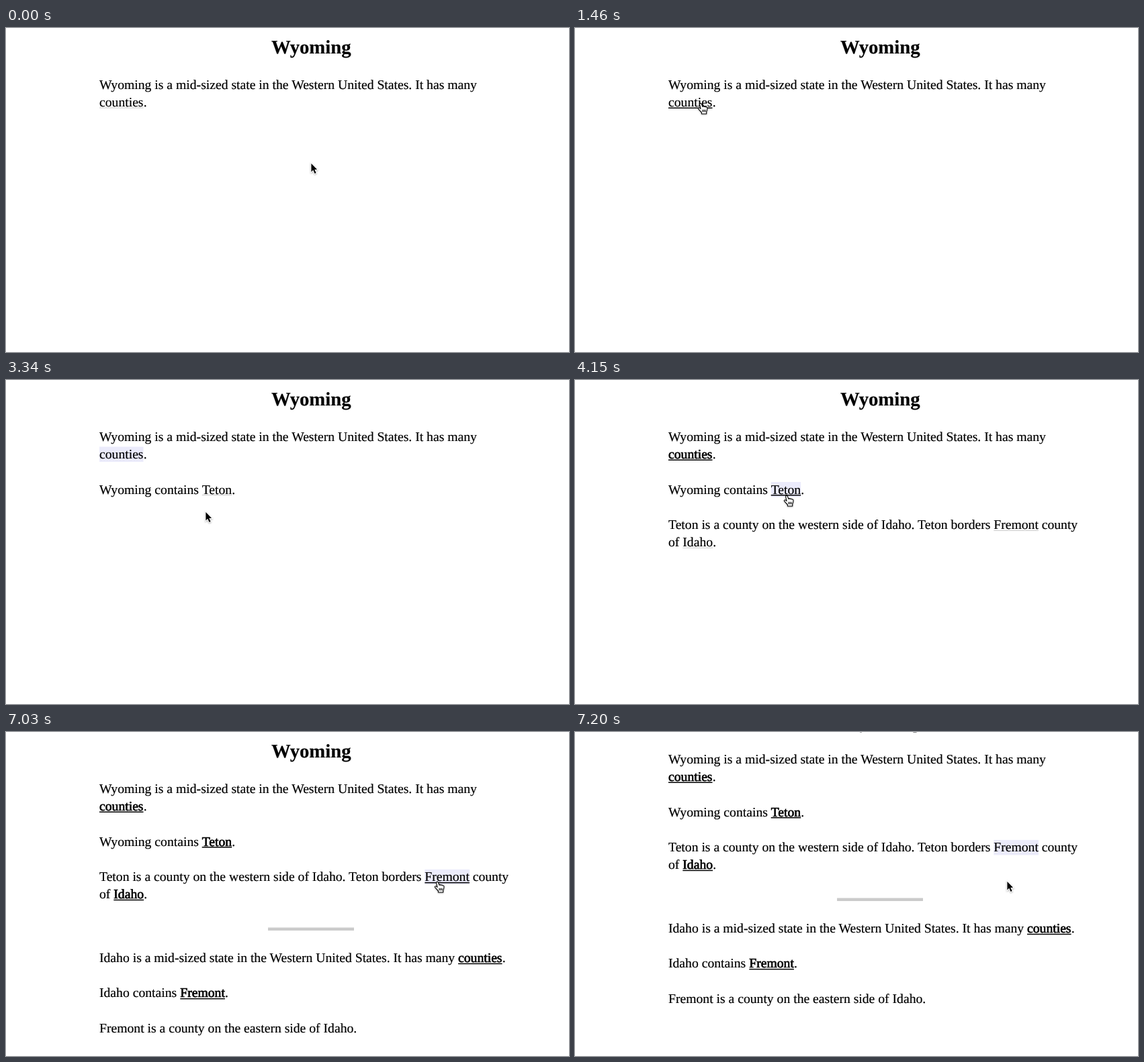
Animation of 838x483 px, one loop 8 s. Source, as an HTML page:

```html
<!DOCTYPE html>
<html lang="en">
<head>
<meta charset="utf-8">
<title>Expanding text</title>
<style>
  html, body { margin: 0; width: 100%; height: 100%; overflow: hidden; background: #fff; }
  svg { display: block; }
  text {
    font: 19.66px "Liberation Serif", "Times New Roman", serif;
    text-rendering: geometricPrecision;
    stroke: #000;
    stroke-width: .2px;
  }
  #title { font-size: 28.7px; font-weight: bold; text-anchor: middle; }
  .mark { fill: none; }
  .line { fill: #c8c8c8; height: 1px; }
  .active .mark { fill: #ebebfb; }
  .active .line { fill: none; }
  .hover .line, .visited .line { fill: #000; height: 1.5px; }
  .visited text { stroke-width: .7px; }
  #arrow, #hand { filter: drop-shadow(0 1px 1px rgba(0, 0, 0, .3)); }
</style>
</head>
<body>
<svg width="838" height="483">
  <g id="page">
    <text id="title" x="454.3" y="38">Wyoming</text>
  </g>
  <g id="cursor">
    <path id="arrow" stroke="#fff" stroke-width="2" paint-order="stroke"
      d="M.4 1V13.4L3.2 10.7 5.5 16 7.6 15.1 5.3 9.9H9.1Z"/>
    <g id="hand" stroke="#000" stroke-width="1.1" stroke-linejoin="round">
      <path fill="#fff" d="M-2.4 3C-2.6 1.2-.3 .7.3 2.2L1.9 6.4C2.3 5.3 4 5.4 4.5 6.6 5 5.7 6.6 5.9 6.9 7.1 7.6 6.4 9 6.8 9 8.4 9.1 10.8 8.4 12.4 7.7 14V17H.4V14.8C-1 13.4-2.6 11.4-4.4 9.6-5.3 8.4-3.8 7.2-2.6 8.1L-1 9.4Z"/>
      <path d="M2 10.8v3.4M4 10.8v3.4M6 10.8v3.4"/>
    </g>
  </g>
</svg>
<script>
const LOOP = 8000, SCROLL_START = 7040, SCROLL_END = 7200, SCROLL_BY = 44;
const OPEN = { counties: 1910, teton: 4150, fremont: 7030 };

const byId = id => document.getElementById(id);
const page = byId('page');
const links = [];

function add(parent, tag, attrs, content = '') {
  const node = document.createElementNS('http://www.w3.org/2000/svg', tag);
  for (const name in attrs) node.setAttribute(name, attrs[name]);
  node.textContent = content;
  return parent.appendChild(node);
}

function section(start) {
  const node = add(page, 'g', {});
  return {
    node, start,
    text(x, y, content) { add(node, 'text', { x, y }, content); return this; },
    // A link is highlighted from `opened` and bold from `visited` on.
    link(x, y, content, visited, opened = Infinity) {
      const g = add(node, 'g', {});
      const mark = add(g, 'rect', { class: 'mark', x, y: y - 17.5, height: 22.5 });
      const line = add(g, 'rect', { class: 'line', x, y: y + 1.5 });
      const width = add(g, 'text', { x, y }, content).getComputedTextLength();
      mark.setAttribute('width', width);
      line.setAttribute('width', width);
      links.push({ g, x, y, width, start, opened, visited });
      return this;
    }
  };
}

const sections = [
  section(0)
    .text(139, 91, 'Wyoming is a mid-sized state in the Western United States. It has many')
    .link(139, 117, 'counties', OPEN.teton, OPEN.counties)
    .text(204.7, 117, '.'),
  section(OPEN.counties)
    .text(139, 169.5, 'Wyoming contains')
    .link(291.7, 169.5, 'Teton', OPEN.fremont, OPEN.teton)
    .text(336.2, 169.5, '.'),
  section(OPEN.teton)
    .text(139, 222.4, 'Teton is a county on the western side of Idaho. Teton borders')
    .link(623.3, 222.4, 'Fremont', Infinity, OPEN.fremont)
    .text(694.7, 222.4, 'county')
    .text(139, 248.2, 'of')
    .link(160.3, 248.2, 'Idaho', OPEN.fremont)
    .text(205.2, 248.2, '.'),
  section(OPEN.fremont)
    .text(139, 343.2, 'Idaho is a mid-sized state in the Western United States. It has many')
    .link(673, 343.2, 'counties', 0)
    .text(738.7, 343.2, '.')
    .text(139, 395.4, 'Idaho contains')
    .link(259.3, 395.4, 'Fremont', 0)
    .text(326, 395.4, '.')
    .text(139, 448, 'Fremont is a county on the eastern side of Idaho.')
];
add(sections[3].node, 'rect', { x: 390, y: 291.5, width: 128, height: 4.5, fill: '#cbcbcb' });

// Pointer waypoints: time, x, y
const path = [
  [0, 454, 201], [480, 454, 201], [640, 436, 204], [900, 325, 186], [1100, 238, 150],
  [1280, 197, 122.5], [1460, 188, 111], [2700, 188, 111], [2880, 203, 146],
  [3100, 250, 194], [3240, 283, 202], [3520, 312, 179], [3730, 316, 171],
  [5540, 316, 171], [5750, 405, 228], [5990, 560, 278], [6150, 618, 259],
  [6340, 642, 224], [6370, 643, 222], [LOOP, 643, 222]
];
const slope = (k, axis) => (path[k + 1][axis] - path[k][axis]) / (path[k + 1][0] - path[k][0]);

function tangent(k, axis) {
  if (k === 0 || k === path.length - 1) return 0;
  const a = slope(k - 1, axis), b = slope(k, axis);
  return a * b > 0 ? 2 * a * b / (a + b) : 0;
}

// Monotone cubic interpolation, so the pointer never overshoots a waypoint.
function pointer(t, axis) {
  const k = path.findIndex(p => p[0] > t) - 1;
  const span = path[k + 1][0] - path[k][0], u = (t - path[k][0]) / span, v = 1 - u;
  return path[k][axis] * v * v * (1 + 2 * u) + path[k + 1][axis] * u * u * (3 - 2 * u)
    + span * u * v * (v * tangent(k, axis) - u * tangent(k + 1, axis));
}

function draw() {
  const t = performance.now() % LOOP;
  const p = Math.min(1, Math.max(0, (t - SCROLL_START) / (SCROLL_END - SCROLL_START)));
  const scroll = SCROLL_BY * p * p * (3 - 2 * p);
  const x = pointer(t, 1), y = pointer(t, 2);
  // Hovering is only re-evaluated once scrolling has finished.
  const pageY = y + (t >= SCROLL_END ? scroll : 0);

  page.setAttribute('transform', `translate(0 ${-scroll})`);
  for (const { node, start } of sections) node.style.display = t >= start ? '' : 'none';

  let hovering = false;
  for (const { g, x: left, y: base, width, start, opened, visited } of links) {
    const hover = t >= start && x >= left && x <= left + width && pageY >= base - 17.5 && pageY < base + 5;
    hovering ||= hover;
    g.classList.toggle('hover', hover);
    g.classList.toggle('visited', t >= visited);
    g.classList.toggle('active', t >= opened && t < visited);
  }

  byId('cursor').setAttribute('transform', `translate(${Math.round(x)} ${Math.round(y)})`);
  byId('hand').style.display = hovering ? '' : 'none';
  byId('arrow').style.display = hovering ? 'none' : '';
  requestAnimationFrame(draw);
}
draw();
</script>
</body>
</html>
```
